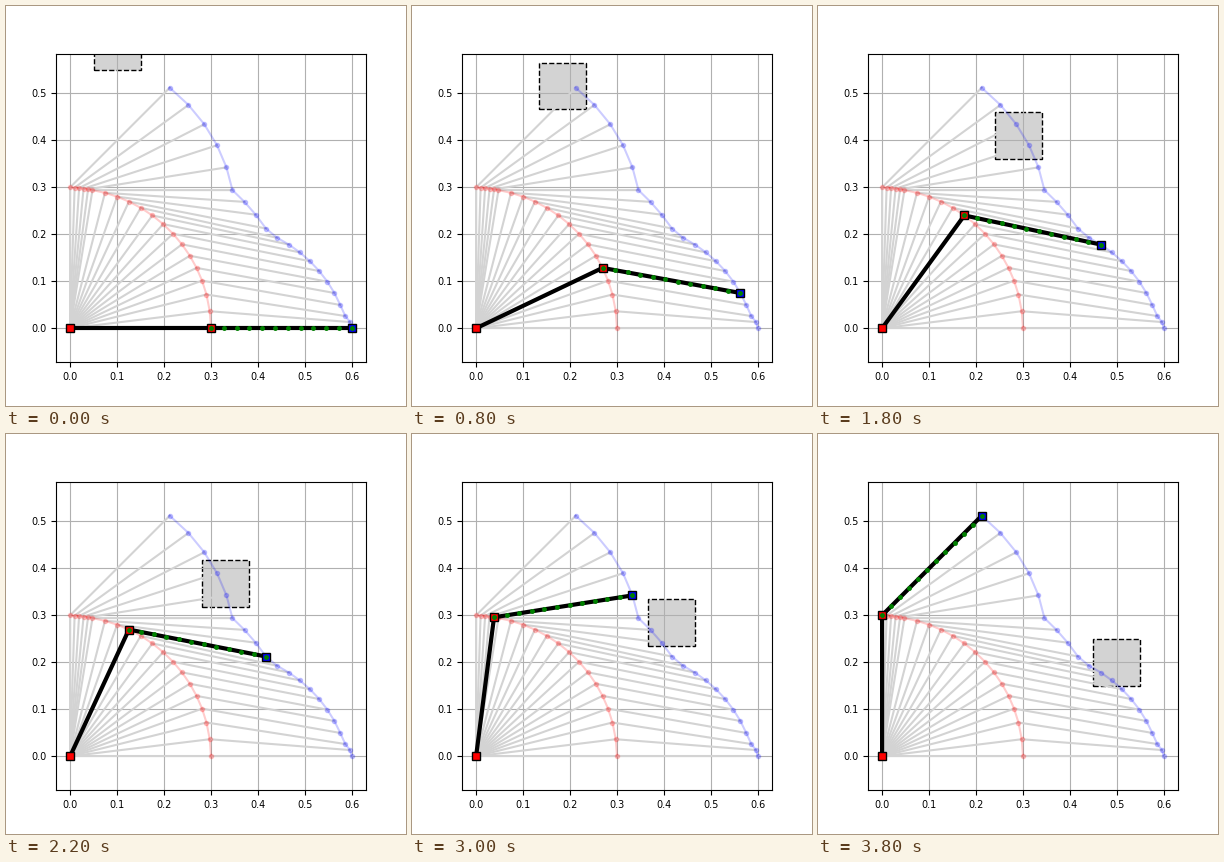
A matplotlib script for the animation above (4 s loop, 400 px wide and 400 px high).

```python
import numpy as np
import matplotlib.pyplot as plt
from matplotlib.animation import FuncAnimation
from matplotlib.patches import Rectangle

plt.rcParams["font.size"] = 7

LINK = 0.3
STEPS = 20
SIDE = 0.1

# planned waypoints: step, then absolute link angles in degrees
KEYS = [0, 2.2, 10.6, 14, 19]
SHOULDER = [0, 15.3, 63, 80.8, 90]
FOREARM = [0, -9.7, -12.6, 0, 45]

step = np.arange(STEPS)
# links shorten slightly in mid-travel
reach = LINK * (1 - 0.009 * np.sin(np.pi * step / (STEPS - 1)))


def link(angles):
    a = np.radians(np.interp(step, KEYS, angles))
    return np.column_stack([reach * np.cos(a), reach * np.sin(a)])


elbow = link(SHOULDER)
hand = elbow + link(FOREARM)
poses = np.stack([np.zeros_like(elbow), elbow, hand], axis=1)
obstacle = np.linspace([0.1, 0.6], [0.5, 0.2], STEPS) - SIDE / 2

fig, ax = plt.subplots(figsize=(4, 4), dpi=100)
ax.set_aspect("equal", adjustable="datalim")
ax.grid(True)

for pose in poses:
    ax.plot(*pose.T, color="lightgray", lw=1.5)
for path, color in ((elbow, "r"), (hand, "b")):
    ax.plot(*path.T, ".-", color=color, alpha=0.2, ms=6, lw=1.5)

# fix the view before the obstacle is added
ax.autoscale_view()
ax.apply_aspect()
ax.autoscale(False)
box = ax.add_patch(Rectangle(obstacle[0], SIDE, SIDE, fc="lightgray",
                             ec="black", ls="--", lw=1))

arm, = ax.plot([], [], "k-", lw=3)
joints = [ax.plot([], [], "s", mfc=c, mec="k", ms=6)[0] for c in "rrb"]
beads, = ax.plot([], [], "g.", ms=5)


def draw(i):
    pose = poses[i]
    box.set_xy(obstacle[i])
    arm.set_data(*pose.T)
    for joint, (x, y) in zip(joints, pose):
        joint.set_data([x], [y])
    beads.set_data(*np.linspace(pose[1], pose[2], 12).T)
    return [box, arm, *joints, beads]


anim = FuncAnimation(fig, draw, frames=STEPS, interval=200, repeat=True,
                     repeat_delay=0)
plt.show()
```
